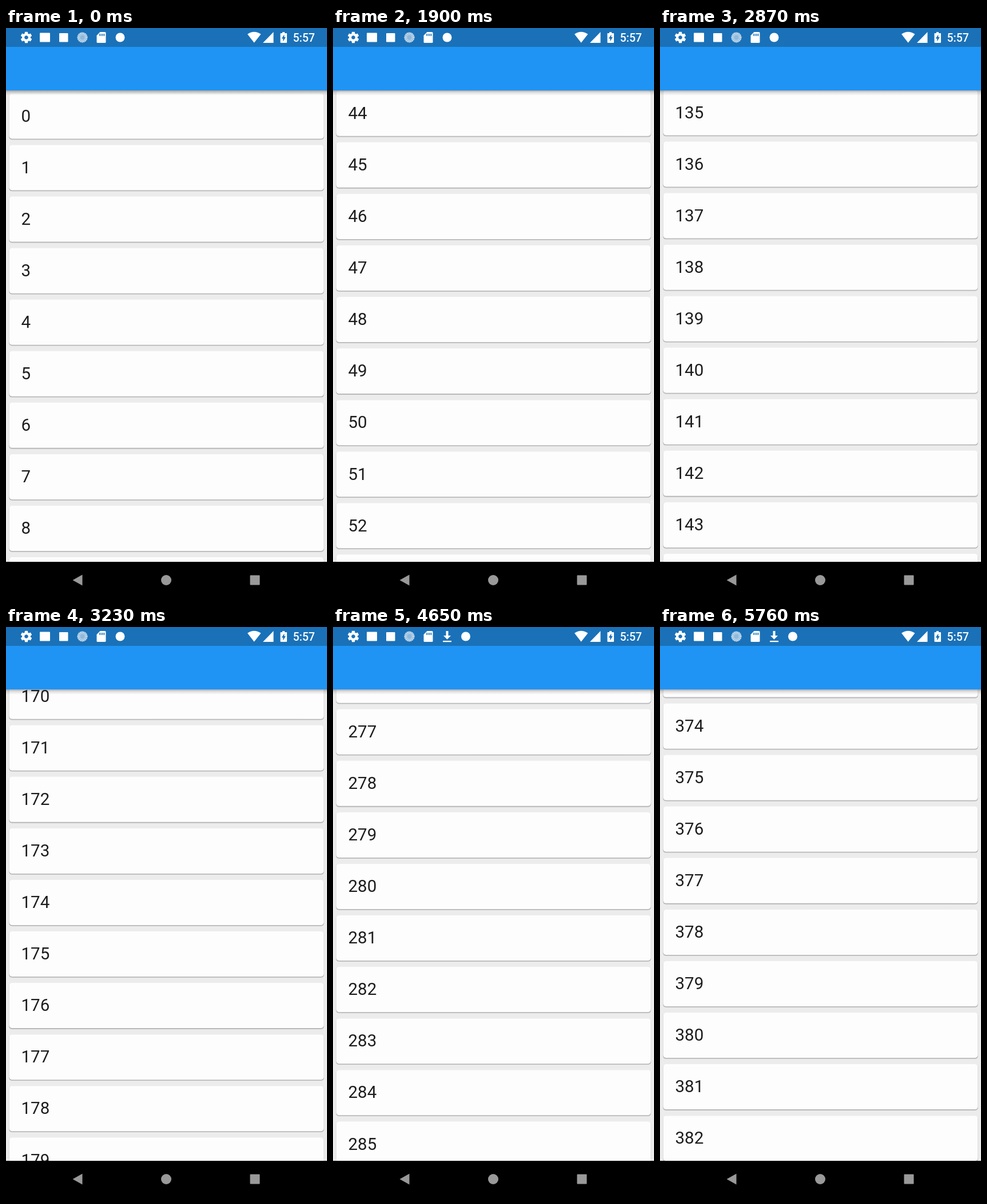
Animation of 561 by 998 pixels, one loop 5.8 s. Source, as an HTML page:

```html
<!DOCTYPE html>
<html lang="en">
<head>
<meta charset="utf-8">
<title>Scrolling list</title>
<style>
  html, body { margin: 0; width: 100%; height: 100%; overflow: hidden; background: #ececec; }
  svg { display: block; width: 100%; height: 100%; }
  text { font-family: Roboto, "Liberation Sans", sans-serif; }
  .row text { font-size: 29.5px; fill: #1d1d1d; }
</style>
</head>
<body>
<svg viewBox="0 0 561 998">
  <defs>
    <linearGradient id="barShadow" x1="0" y1="0" x2="0" y2="1">
      <stop offset="0" stop-color="#000" stop-opacity=".32"/>
      <stop offset=".4" stop-color="#000" stop-opacity=".12"/>
      <stop offset="1" stop-color="#000" stop-opacity="0"/>
    </linearGradient>
  </defs>
  <rect width="561" height="998" fill="#ececec"/>
  <g id="list"></g>

  <rect y="109" width="561" height="9" fill="url(#barShadow)"/>
  <rect y="32" width="561" height="77" fill="#1f94f5"/>
  <rect width="561" height="33" fill="#1a71b8"/>

  <g fill="#fff">
    <g transform="translate(35.5 16.5)">
      <g id="gear"></g>
      <circle r="5.4" fill="none" stroke="#fff" stroke-width="4.2"/>
    </g>
    <rect x="59" y="8.5" width="18" height="16" rx="1"/>
    <rect x="93" y="9" width="15.5" height="15.5" rx="1"/>
    <circle cx="133.5" cy="16.5" r="9" fill="#8fb9db"/>
    <circle cx="133.5" cy="16.5" r="6.5" fill="none" stroke="#d3e3f0" stroke-width="5" stroke-dasharray="1 1.4"/>
    <path d="M164.500 7H173a1.500 1.500 0 0 1 1.500 1.500V24.500a1.500 1.500 0 0 1-1.500 1.500H160a1.500 1.500 0 0 1-1.500-1.500V13Z"/>
    <path d="M164.300 10v4M167.800 10v4M171.300 10v4" stroke="#1a71b8" stroke-width="1.800"/>
    <path id="download" d="M197.500 7h4v8h4.500l-6.500 6.700-6.500-6.700h4.500ZM192 24h15v2.200H192Z"/>
    <circle id="badge" cy="16.500" r="8"/>
    <path d="M422 10.800Q433.500 2.500 445.500 10.800L433.700 25.800Z"/>
    <path d="M467.500 7V26H449Z"/>
    <path d="M483 7h4v2h3a1 1 0 0 1 1 1V25a1 1 0 0 1-1 1H480.500a1 1 0 0 1-1-1V10a1 1 0 0 1 1-1H483Z"/>
    <path d="M486.300 11.500V16h2.500L484.300 23.500V18.500H481.700Z" fill="#1a71b8"/>
    <text x="501.500" y="23.500" font-size="19.500" font-weight="500">5:57</text>
  </g>

  <rect y="933" width="561" height="65"/>
  <g fill="#999">
    <path d="M116.500 965L133.500 955.500V974.500Z"/>
    <circle cx="280" cy="965" r="9"/>
    <rect x="426.500" y="956.500" width="17" height="17" rx="1"/>
  </g>
</svg>
<script>
const LOOP = 5800, TICKS = 131, STEP = LOOP / TICKS;
const PITCH = 90.06, TOP = 114.5, VISIBLE = 11;
const END_SPEED = 0.65;
const byId = id => document.getElementById(id);
const clamp01 = x => Math.min(1, Math.max(0, x));

function add(parent, tag, attrs) {
  const node = document.createElementNS("http://www.w3.org/2000/svg", tag);
  for (const name in attrs) node.setAttribute(name, attrs[name]);
  return parent.appendChild(node);
}

for (let i = 0; i < 6; i++)
  add(byId("gear"), "rect", { x: -2.6, y: -9.8, width: 5.2, height: 5, rx: 0.6, transform: `rotate(${i * 60})` });

const rows = Array.from({ length: VISIBLE }, () => {
  const group = add(byId("list"), "g", { class: "row" });
  const card = (x, y, w, h, fill) => add(group, "rect", { x, y, width: w, height: h, rx: 5, fill });
  card(4.8, 0.2, 551.4, 80, "#dedede");
  card(5.2, 1, 550.6, 79.8, "#b9b9b9");
  card(5.5, 0, 550, 79, "#fdfdfd");
  return { group, label: add(group, "text", { x: 26.5, y: 49.3 }) };
});

// Speed rises during the drag, then decays slowly until the next touch.
function progress(u, drag) {
  const travel = v => v < drag
    ? v * v / (2 * drag)
    : drag / 2 + (v - drag) - (1 - END_SPEED) * (v - drag) ** 2 / (2 * (1 - drag));
  return travel(clamp01(u)) / travel(1);
}

// Times in ticks: start, stop, a moment on the way and the row on top then.
let reached = 0;
const flings = [
  [0, 19, 19, 4, 0.25],
  [21, 38, 28, 13.02, 0.45],
  [40, 57, 55, 117.035, 0.25],
  [60, 77, 73, 170.364, 0.25],
  [81, 97, 91, 230.765, 0.25],
  [99, 118, 105, 276.675, 0.25],
  [120, 140, 130, 373.787, 0.25]
].map(([start, stop, at, row, drag]) => {
  const distance = (row - reached) / progress((at - start) / (stop - start), drag);
  reached += distance;
  return tick => distance * progress((tick - start) / (stop - start), drag);
});

function render(ms) {
  const tick = Math.floor((ms + 6) / STEP) % TICKS;
  const scroll = flings.reduce((sum, fling) => sum + fling(tick), 0);
  const first = Math.max(0, Math.floor(scroll) - 1);
  rows.forEach(({ group, label }, i) => {
    const index = first + i;
    group.setAttribute("transform", `translate(0 ${(TOP + (index - scroll) * PITCH).toFixed(2)})`);
    label.textContent = index;
  });
  const time = tick * STEP;
  byId("download").setAttribute("opacity", clamp01((time - 3850) / 420));
  byId("badge").setAttribute("cx", 199.5 + 32.5 * clamp01((time - 3650) / 200));
}

const began = performance.now();
function frame() {
  render((performance.now() - began) % LOOP);
  requestAnimationFrame(frame);
}
render(0);
requestAnimationFrame(frame);
</script>
</body>
</html>
```
